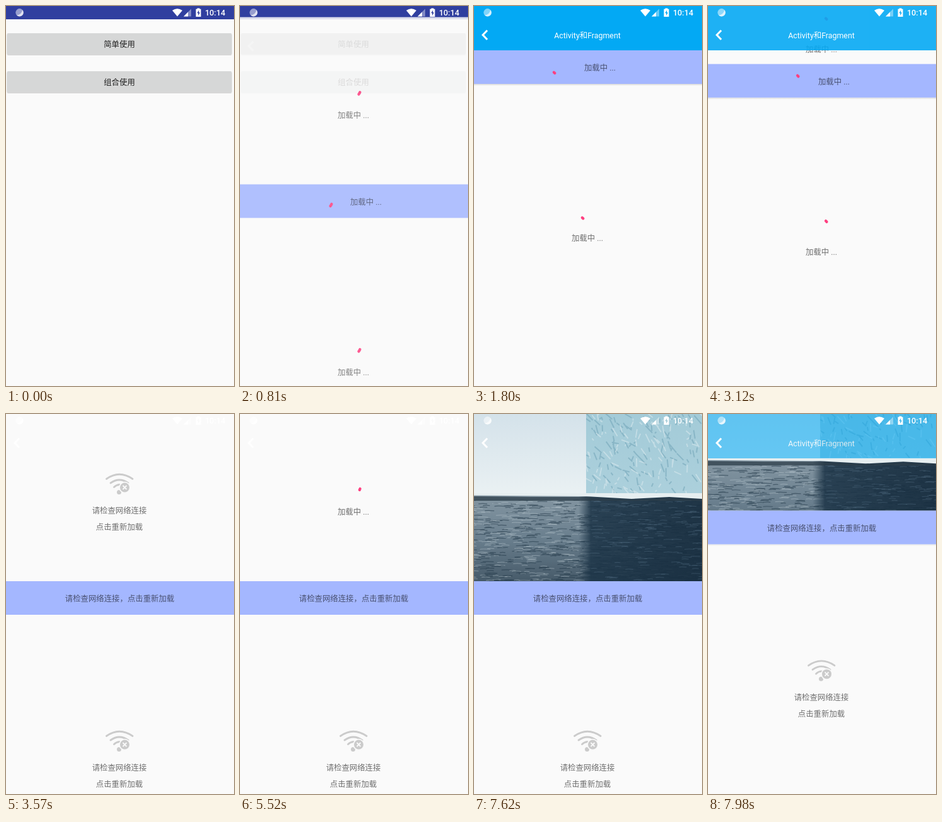
Animation of 362x600 px, one loop 8 s. Source, as an HTML page:

```html
<!DOCTYPE html>
<html lang="zh-CN">
<head>
<meta charset="utf-8">
<title>Loading states</title>
<style>
  html, body { margin: 0; width: 100%; height: 100%; overflow: hidden; background: #fafafa; }
  svg { display: block; width: 362px; height: 600px; }
  text { font: 12.4px Roboto, "Noto Sans CJK SC", "Noto Sans CJK", sans-serif; text-anchor: middle; fill: #707070; }
  .menu text { fill: #1f1f1f; }
  .band text { fill: #4a5273; }
  .title { fill: #fff; }
  .clock { font-weight: 500; font-size: 12.7px; fill: #fff; }
  .spinner { fill: none; stroke: #ff4081; stroke-width: 4.3; stroke-linecap: round; }
</style>
</head>
<body>
<svg viewBox="0 0 362 600">
  <defs>
    <clipPath id="button"><rect x="1.5" y="43" width="357" height="33.5" rx="2"/></clipPath>
    <clipPath id="photoBox"><rect width="362" height="264"/></clipPath>
    <clipPath id="iceBox"><rect x="178" width="184" height="128"/></clipPath>
    <linearGradient id="shade" x2="0" y2="1">
      <stop stop-opacity=".14"/><stop offset="1" stop-opacity="0"/>
    </linearGradient>
    <linearGradient id="sky" x2="0" y2="1">
      <stop stop-color="#d4e2ea"/><stop offset="1" stop-color="#eaf1f3"/>
    </linearGradient>
    <linearGradient id="ice" x2="0" y2="1">
      <stop stop-color="#a3cbd8"/><stop offset="1" stop-color="#acd0dc"/>
    </linearGradient>
    <linearGradient id="sea" x2="0" y2="1">
      <stop stop-color="#8496a2"/><stop offset=".5" stop-color="#6a7f8e"/><stop offset="1" stop-color="#465a69"/>
    </linearGradient>
    <linearGradient id="dusk">
      <stop stop-color="#1c3447" stop-opacity="0"/><stop offset=".1" stop-color="#1c3447" stop-opacity=".86"/>
      <stop offset="1" stop-color="#162c3e" stop-opacity=".92"/>
    </linearGradient>
    <g id="noWifi">
      <g fill="none" stroke="#cbcbcb" stroke-width="2.8" stroke-linecap="round">
        <path d="M159.500 102.500Q180 88 201 102.500M166 109Q180 99 194 109M171.500 115.500Q175 112 180 111.500"/>
      </g>
      <circle cx="179.500" cy="123.500" r="3.500" fill="#cbcbcb"/>
      <circle cx="188.500" cy="116" r="9.200" fill="#fafafa"/>
      <circle cx="188.500" cy="116" r="7.500" fill="#cbcbcb"/>
      <path d="M185.500 113l6 6m0-6l-6 6" stroke="#fafafa" stroke-width="1.800"/>
    </g>
    <g id="failure">
      <use href="#noWifi"/>
      <text x="180" y="157">请检查网络连接</text>
      <text x="180" y="183">点击重新加载</text>
    </g>
  </defs>

  <g class="menu">
    <rect width="362" height="600" fill="#fafafa"/>
    <rect width="362" height="21" fill="#303f9f"/>
    <g fill="#000" opacity=".13">
      <rect x="1.500" y="44.500" width="357" height="33.500" rx="2"/>
      <rect x="1.500" y="104.500" width="357" height="33.500" rx="2"/>
    </g>
    <g fill="#d6d7d7">
      <rect x="1.500" y="43" width="357" height="33.500" rx="2"/>
      <rect x="1.500" y="103" width="357" height="33.500" rx="2"/>
    </g>
    <g clip-path="url(#button)"><circle id="ripple" cx="200" cy="60" opacity=".12"/></g>
    <text x="180" y="64.500">简单使用</text>
    <text x="180" y="124.500">组合使用</text>
  </g>

  <g id="page">
    <rect width="362" height="600" fill="#fafafa"/>
    <g id="top">
      <g id="topLoading">
        <path class="spinner" data-x="180" data-y="114.500"/>
        <text x="180" y="159">加载中 ...</text>
      </g>
      <use id="topFailure" href="#failure"/>
      <g id="photo" clip-path="url(#photoBox)">
        <rect width="178" height="128" fill="url(#sky)"/>
        <rect x="178" width="184" height="128" fill="url(#ice)"/>
        <g clip-path="url(#iceBox)" fill="none">
          <path id="clefts" stroke="#6c9fb4" stroke-width="2" opacity=".5"/>
          <path id="ridges" stroke="#e2eef2" stroke-width="1.800" opacity=".5"/>
        </g>
        <rect y="128" width="362" height="136" fill="url(#sea)"/>
        <g fill="none">
          <path id="waves" stroke="#1b3041" stroke-width="1.200" opacity=".5"/>
          <path id="foam" stroke="#c3d0d8" stroke-width="1" opacity=".45"/>
        </g>
        <rect x="166" y="128" width="196" height="136" fill="url(#dusk)"/>
        <g fill="none">
          <path id="nightFoam" stroke="#5f7d92" stroke-width=".9" opacity=".4"/>
        </g>
        <path d="M0 125H362V134L310 131 250 134 178 130 0 128.500Z" fill="#e6eef0"/>
        <path d="M0 130L90 131 178 131 250 135 310 132.500 362 135V137H0Z" fill="#2b3c48" opacity=".75"/>
      </g>
    </g>
    <g id="body">
      <rect y="264" width="362" height="536" fill="#fafafa"/>
      <rect id="shadow" y="317" width="362" height="3" fill="url(#shade)"/>
      <g class="band">
        <rect y="264" width="362" height="53" fill="#a4b7ff"/>
        <g class="loading">
          <path class="spinner" data-x="135" data-y="291"/>
          <text x="200" y="296">加载中 ...</text>
        </g>
        <text class="failed" x="180.500" y="296">请检查网络连接，点击重新加载</text>
      </g>
      <g class="loading">
        <path class="spinner" data-x="180" data-y="520.500"/>
        <text x="180" y="565">加载中 ...</text>
      </g>
      <use class="failed" href="#failure" y="406"/>
    </g>
    <g id="header">
      <rect width="362" height="70" fill="#03a9f4"/>
      <text class="title" x="180" y="50.500">Activity和Fragment</text>
    </g>
    <path d="M21 38.500L14 45.700 21 53" fill="none" stroke="#fff" stroke-width="3"/>
  </g>

  <g fill="#fff">
    <circle cx="21.500" cy="10.300" r="6.200" opacity=".5"/>
    <path d="M26 6A6.200 6.200 0 1 1 17 14.600A9 9 0 0 0 26 6Z" opacity=".7"/>
    <path d="M264 7Q272 1.500 280 7L272 16.500Z"/>
    <path d="M294 4.500V16.500H282Z" opacity=".4"/>
    <path d="M289 9.500V16.500H282Z"/>
    <path fill-rule="evenodd" d="M303.500 3.500H307.500V4.800H309.500V17H301.500V4.800H303.500ZM306.300 6.500L303.300 11.300H305.200V15.200L308 10.200H306.300Z"/>
    <text class="clock" x="332" y="15.200">10:14</text>
  </g>
</svg>
<script>
const LOOP = 8000, CYCLE = 1200, COLLAPSE = 194;
const OPEN = 720, FAIL = 3570, RETRY = 4350, LOADED = 7230;
const SWEEP = 282, TURN_SPEED = .127;
const scrollSteps = [
  [1260, 0], [1290, 22], [1350, 73], [1410, 126], [1470, 166], [1530, 187], [1590, 194],
  [2990, 194], [3060, 188], [3120, 173], [3210, 118], [3300, 56], [3390, 15], [3480, 0],
  [7650, 0], [7740, 22], [7980, 111], [8000, 118]
];

const $ = id => document.getElementById(id);
const all = selector => [...document.querySelectorAll(selector)];
const clamp = v => Math.min(1, Math.max(0, v));
const easeOut = v => 1 - (1 - clamp(v)) ** 3;
const show = (el, on) => el.setAttribute('display', on ? 'inline' : 'none');
const shift = (el, y) => el.setAttribute('transform', `translate(0 ${y})`);

function track(steps, t) {
  const i = steps.findIndex(([time]) => time > t);
  if (i === 0) return steps[0][1];
  if (i < 0) return steps[steps.length - 1][1];
  const [t0, a] = steps[i - 1], [t1, b] = steps[i];
  return a + (b - a) * (t - t0) / (t1 - t0);
}

// Cubic easing from (0,0) to (0.5,1) with handles at x1 and x2.
function halfEase(x, x1, x2) {
  if (x <= 0) return 0;
  if (x >= .5) return 1;
  let lo = 0, hi = 1;
  for (let i = 0; i < 24; i++) {
    const m = (lo + hi) / 2, n = 1 - m;
    if (3 * n * n * m * x1 + 3 * n * m * m * x2 + .5 * m ** 3 < x) lo = m; else hi = m;
  }
  return lo * lo * (3 - 2 * lo);
}

function arc(cx, cy, from, length, r = 11.2) {
  const point = deg => {
    const a = deg * Math.PI / 180;
    return `${(cx + r * Math.cos(a)).toFixed(2)} ${(cy + r * Math.sin(a)).toFixed(2)}`;
  };
  return `M${point(from)}A${r} ${r} 0 ${length > 180 ? 1 : 0} 1 ${point(from + length)}`;
}

function spin(elapsed, turn) {
  const time = Math.max(0, elapsed), phase = time % CYCLE / CYCLE;
  const head = SWEEP * halfEase(phase, .2, .1);
  const tail = SWEEP * halfEase(phase - .5, .2, .1);
  const from = turn + time * TURN_SPEED + phase * (360 - SWEEP) + tail;
  return { from, length: Math.max(10, head - tail) };
}

function scatter(id, count, seed, draw) {
  const random = () => (seed = seed * 16807 % 2147483647) / 2147483647;
  const between = (a, b) => +(a + (b - a) * random()).toFixed(1);
  $(id).setAttribute('d', Array.from({ length: count }, () => draw(between)).join(''));
}
const ripples = left => between =>
  `M${between(left, 362)} ${between(136, 264)}q${between(3, 8)} -1 ${between(8, 18)} 0`;
const facets = between =>
  `M${between(176, 355)} ${between(-5, 125)}l${between(-4, 12)} ${between(2, 14)}`;

scatter('waves', 620, 17, ripples(-10));
scatter('foam', 420, 91, ripples(-10));
scatter('nightFoam', 160, 43, ripples(184));
scatter('clefts', 110, 5, facets);
scatter('ridges', 90, 29, facets);

const spinners = all('.spinner'), loading = all('.loading'), failed = all('.failed');

function render(t) {
  const scroll = track(scrollSteps, t), alpha = scroll / COLLAPSE;

  $('ripple').setAttribute('r', 360 * clamp((t - 565) / 230));
  show($('ripple'), t >= 570);
  show($('page'), t >= OPEN);
  $('page').setAttribute('opacity', easeOut((t - OPEN) / 190));
  shift($('page'), 48 * (1 - easeOut((t - OPEN) / 320)));

  shift($('top'), -scroll / 2);
  shift($('body'), -scroll);
  $('header').setAttribute('opacity', alpha);
  $('shadow').setAttribute('opacity', alpha);

  loading.forEach(el => show(el, t < FAIL));
  failed.forEach(el => show(el, t >= FAIL));
  show($('topLoading'), t < FAIL || t >= RETRY && t < LOADED);
  show($('topFailure'), t >= FAIL && t < RETRY);
  show($('photo'), t >= LOADED);
  $('photo').setAttribute('opacity', clamp((t - LOADED) / 270));

  const { from, length } = t < RETRY ? spin(t - OPEN, 4) : spin(t - RETRY + 15, -131);
  spinners.forEach(el => el.setAttribute('d', arc(+el.dataset.x, +el.dataset.y, from, length)));
}

const start = performance.now();
function frame() {
  render((performance.now() - start) % LOOP);
  requestAnimationFrame(frame);
}
frame();
</script>
</body>
</html>
```
